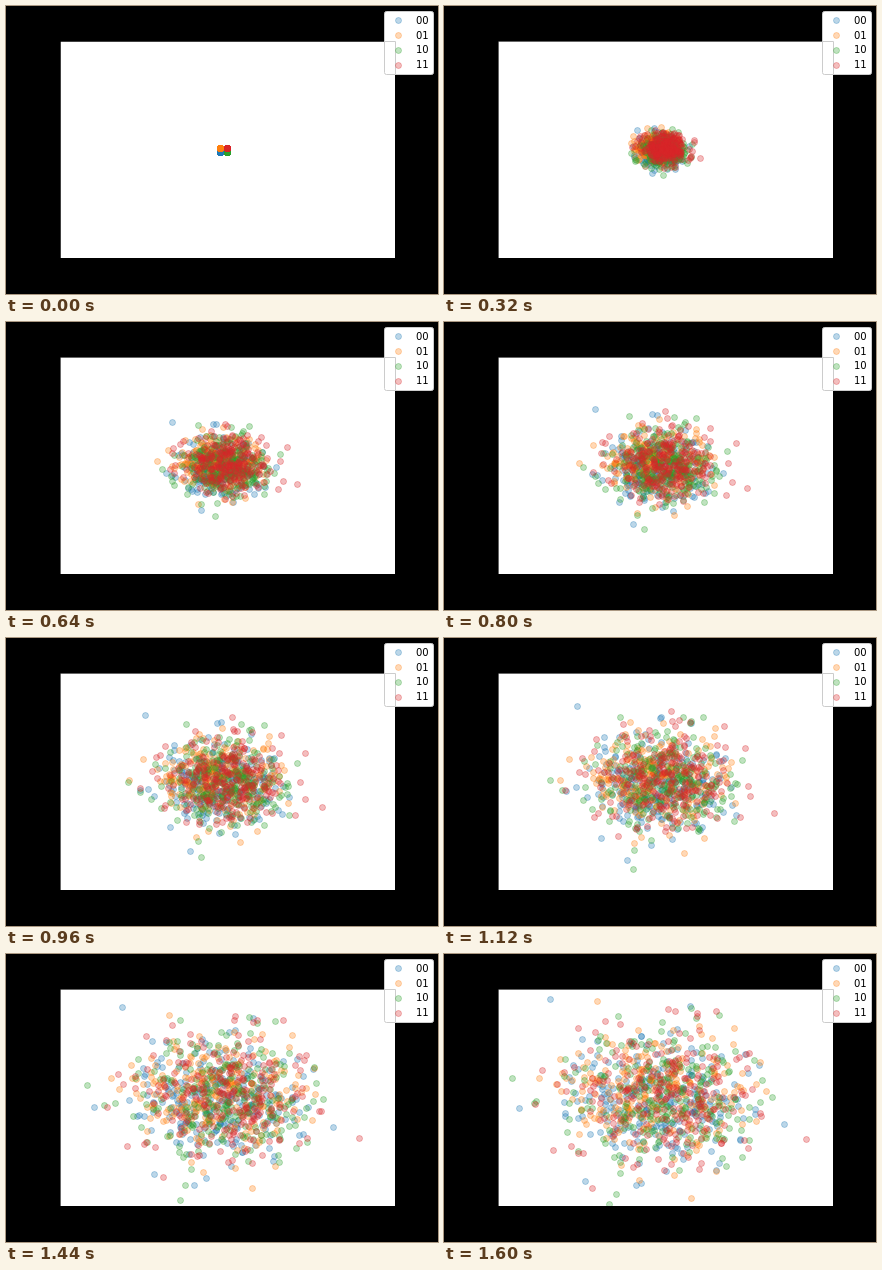
An HTML page with a canvas that plays this animation: 432x288 px, repeating every 1.62 s.

```html
<!DOCTYPE html>
<html lang="en">
<head>
<meta charset="utf-8">
<title>Spreading clusters</title>
<style>
  html, body { margin: 0; width: 100%; height: 100%; overflow: hidden; background: #000; }
  canvas, svg { position: absolute; left: 0; top: 0; display: block; }
  text { font: 10px "DejaVu Sans", sans-serif; }
</style>
</head>
<body>
<canvas id="plot" width="432" height="288"></canvas>
<svg id="legend" width="432" height="288" viewBox="0 0 432 288">
  <rect x="378.5" y="5.5" width="49" height="63" rx="2" fill="#fff" stroke="#ccc"/>
  <path d="M379 35.5H389.5V68" fill="none" stroke="#ccc"/>
</svg>
<script>
const STEP = 20, STEPS = 81, PER_GROUP = 250;
const AREA = [54.5, 35.5, 334.5, 216.5];
const SPEED_X = 0.68, SPEED_Y = 0.5, KEEP = 0.985;
const groups = [
  { label: "00", color: "#1f77b4", x: 214, y: 146 },
  { label: "01", color: "#ff7f0e", x: 214, y: 142 },
  { label: "10", color: "#2ca02c", x: 221, y: 146 },
  { label: "11", color: "#d62728", x: 221, y: 142 }
];

let seed = 20117;
function random() {
  seed = (seed + 0x6d2b79f5) | 0;
  let r = Math.imul(seed ^ (seed >>> 15), 1 | seed);
  r = (r + Math.imul(r ^ (r >>> 7), 61 | r)) ^ r;
  return ((r ^ (r >>> 14)) >>> 0) / 4294967296;
}
const gauss = () =>
  Math.sqrt(-2 * Math.log(1 - random())) * Math.cos(2 * Math.PI * random());

// Positions along one axis of a particle whose velocity changes slowly at random
function drift(from, speed) {
  const path = new Float32Array(STEPS);
  const kick = speed * Math.sqrt(1 - KEEP * KEEP);
  let v = speed * gauss();
  path[0] = from;
  for (let n = 1; n < STEPS; n++) {
    path[n] = path[n - 1] + v;
    v = KEEP * v + kick * gauss();
  }
  return path;
}

for (const group of groups) {
  group.dots = Array.from({ length: PER_GROUP }, () => ({
    xs: drift(group.x, SPEED_X),
    ys: drift(group.y, SPEED_Y)
  }));
}

const legend = document.getElementById("legend");
function add(tag, attrs, content = "") {
  const el = document.createElementNS("http://www.w3.org/2000/svg", tag);
  for (const key in attrs) el.setAttribute(key, attrs[key]);
  el.textContent = content;
  legend.append(el);
}
groups.forEach(({ label, color }, i) => {
  add("circle", {
    cx: 392.5, cy: 14.5 + 15 * i, r: 3, fill: color, stroke: color,
    "fill-opacity": 0.3, "stroke-opacity": 0.3
  });
  add("text", { x: 410, y: Math.round(18 + 14.7 * i) }, label);
});

const ctx = document.getElementById("plot").getContext("2d");
ctx.beginPath();
ctx.rect(...AREA);
ctx.clip();

const snap = v => Math.floor(v) + 0.5;

function draw(n) {
  ctx.globalAlpha = 1;
  ctx.clearRect(0, 0, 432, 288);
  ctx.fillStyle = "#fff";
  ctx.fillRect(...AREA);
  ctx.globalAlpha = 0.3;
  for (const { color, dots } of groups) {
    ctx.fillStyle = ctx.strokeStyle = color;
    for (const { xs, ys } of dots) {
      ctx.beginPath();
      ctx.arc(snap(xs[n]), snap(ys[n]), 3, 0, 2 * Math.PI);
      ctx.fill();
      ctx.stroke();
    }
  }
}

const start = performance.now();
let shown = -1;
function tick() {
  const n = Math.floor((performance.now() - start) / STEP) % STEPS;
  if (n !== shown) draw(shown = n);
  requestAnimationFrame(tick);
}
tick();
</script>
</body>
</html>
```
